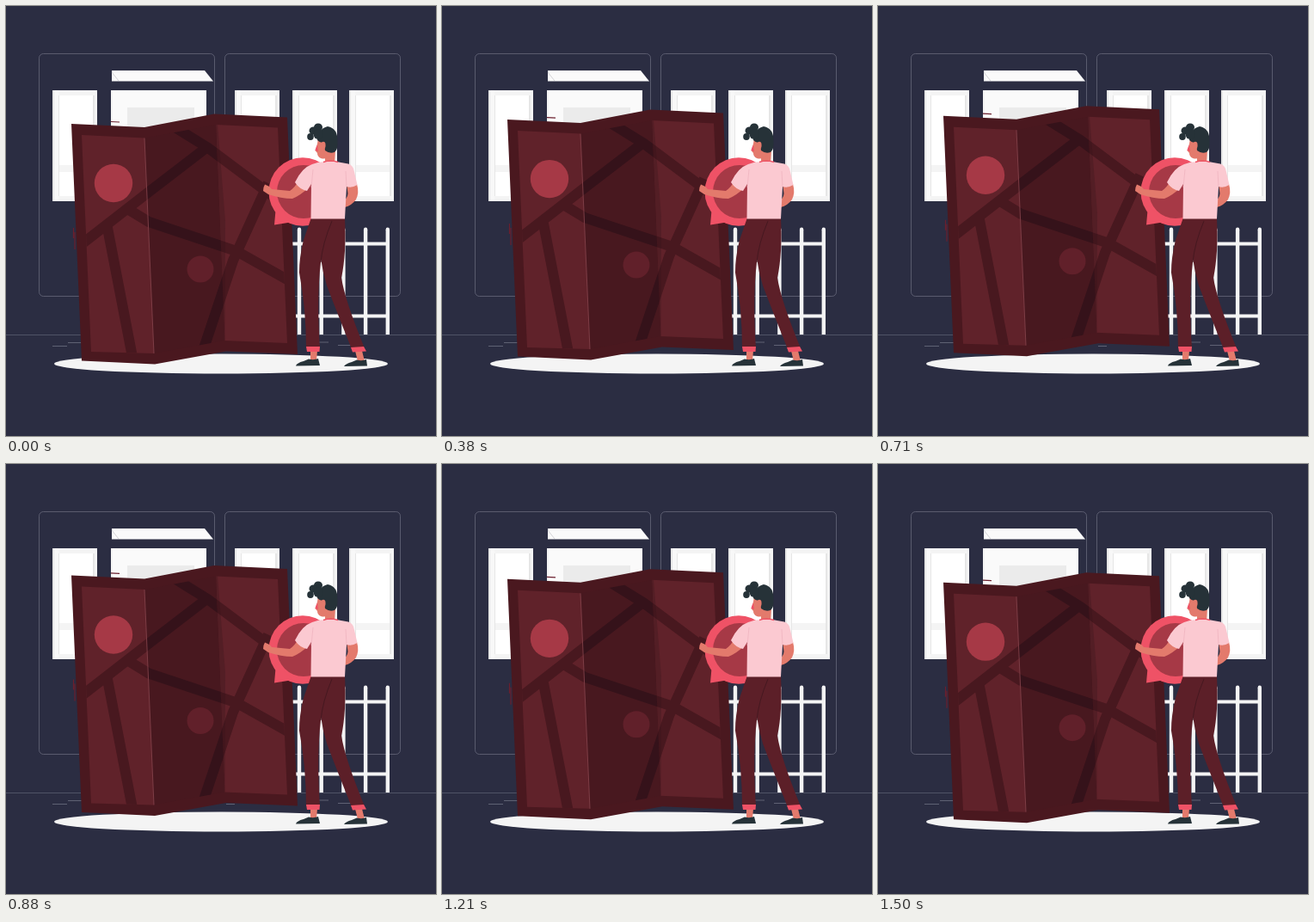
These frames come from a looping animation (500 px wide and 500 px high, 1.54 s). An HTML page with a canvas:

```html
<!DOCTYPE html>
<html lang="en">
<head>
<meta charset="utf-8">
<title>Floating map</title>
<style>
html, body { margin: 0; width: 100%; height: 100%; overflow: hidden; background: #2b2d42; }
canvas { display: block; width: 500px; height: 500px; }
</style>
</head>
<body>
<canvas id="stage" width="500" height="500"></canvas>
<script>
const ctx = document.getElementById('stage').getContext('2d');
const LOOP = 1540;
const FPS = 24;

const C = {
  night: '#2b2d42', faint: '#66687a', white: '#ffffff', pale: '#f4f4f4', grey: '#e6e6e6',
  border: '#4a181f', panel: '#60222a', fold: '#48181f', road: '#48181f', foldRoad: '#35121a',
  red: '#ef5266', crimson: '#a63946', hair: '#263238', skin: '#e37a6c',
  shirt: '#fbc9d1', trousers: '#5c1f28'
};

function fill(d, color) {
  ctx.fillStyle = color;
  ctx.fill(new Path2D(d));
}

function stroke(d, color, width = 1, cap = 'butt') {
  ctx.strokeStyle = color;
  ctx.lineWidth = width;
  ctx.lineCap = cap;
  ctx.lineJoin = 'miter';
  ctx.stroke(new Path2D(d));
}

function rect(x, y, w, h, color) {
  ctx.fillStyle = color;
  ctx.fillRect(x, y, w, h);
}

function ellipse(x, y, rx, ry, color) {
  ctx.fillStyle = color;
  ctx.beginPath();
  ctx.ellipse(x, y, rx, ry, 0, 0, Math.PI * 2);
  ctx.fill();
}

function drawWindow(x) {
  rect(x, 98, 52, 129, C.pale);
  rect(x, 98, 2, 129, C.grey);
  rect(x + 8, 104, 39, 117, C.white);
  rect(x + 2, 98, 5, 129, '#f8f8f8');
  rect(x + 7, 104, 1, 117, C.grey);
  rect(x + 47, 104, 2, 117, C.grey);
  rect(x + 8, 185, 39, 8, C.pale);
}

function drawRoom() {
  rect(0, 0, 500, 500, C.night);
  ctx.strokeStyle = C.faint;
  ctx.lineWidth = 0.8;
  for (const x of [38.5, 254.5]) {
    ctx.beginPath();
    ctx.roundRect(x, 55.5, 204, 282, 5);
    ctx.stroke();
  }
  stroke('M0 382.5H500', '#55576a', 0.9);
  stroke('M54 395.5H71 M72 391.5H88 M256 395.5H266 M362 391H375 M386 394.5H402', C.faint, 0.9);

  [54, 266, 333, 399].forEach(drawWindow);
  rect(122, 98, 111, 129, '#fafafa');
  rect(122, 98, 2, 129, C.pale);
  rect(141, 118, 78, 100, '#ebebeb');
  fill('M123 75H231L241 87.5H123Z', '#fafafa');
  stroke('M123 77L131 87', '#c9c9cf', 0.8);

  ellipse(250, 416, 194, 11.5, C.pale);
}

function drawFence() {
  stroke('M332 276.5H444 M332 360.5H444', C.pale, 4.2);
  for (let i = 0; i < 5; i++) {
    const x = 341 + i * 25.7;
    rect(x - 2.2, 260, 4.4, 122, C.pale);
    ellipse(x, 260, 2.2, 2.4, C.pale);
  }
}

const ROADS = 'M84 280L165 217L234 164 M193 139L235 165L310 221 ' +
  'M143 237L166 251L268 285L332 321 M305 206L264 296L230 398 M118 258L147 408';
const SIDES = 'M88 150L161 153.5L172 404L99 402Z M244 138L316 141.5L327 392L254 389Z';
const MIDDLE = 'M161 153.5L244 138L254.5 389L172 404Z';

function drawPanel(shape, color, roadColor) {
  ctx.save();
  ctx.clip(new Path2D(shape));
  rect(70, 120, 280, 300, color);
  stroke(ROADS, roadColor, 12);
  ctx.restore();
}

function drawMap(dy) {
  ctx.save();
  ctx.translate(0, dy);
  stroke('M122 134.5L132 135 M78.5 258V270 M80 263V283', '#6b1f2e', 1.2);
  fill('M76 137L161 141L242 125.5L327 129.5L339 405L256 401.5L173 416.5L88 412.5Z', C.border);
  drawPanel(SIDES, C.panel, C.road);
  drawPanel(MIDDLE, C.fold, C.foldRoad);
  fill('M244 138L246 138L255 250L254.5 389Z', 'rgba(53,18,26,.28)');
  stroke('M161 153.5L172 404', '#8b4750', 0.8);
  ellipse(125, 206, 22.2, 22.2, C.crimson);
  ellipse(226, 306, 15.5, 15.5, '#61202a');
  ctx.restore();
}

function drawPin() {
  ellipse(345, 216, 39.5, 39.8, C.red);
  fill('M314 232L312 254.5L334 251Z', C.red);
  ellipse(346, 216, 31, 31, C.crimson);
}

function drawPerson() {
  // Far arm, shoes and ankles
  fill('M396 207L408 207Q411 217 407 225Q402 232 394 234L393 226Q399 222 397 214Z', C.skin);
  fill('M354 401H362L361 412H354Z M406 401L414 401L417 413L409 413Z', C.skin);
  fill('M337 418.5Q338 415 346 413L352 410.5Q358 412 363 410L365 418Z', C.hair);
  fill('M393 419Q395 416 402 414L408 411.5Q414 413 419 411L420 418.5Z', C.hair);

  // Legs
  fill('M394 246Q396 288 390 316Q394 342 417 398L402 399Q384 354 373 325Q368 309 366 293L373 246Z', C.trousers);
  fill('M355 246H380Q369 278 366 298Q361 340 365 398H349Q349 352 341 310Q341 292 346 272Z', C.trousers);
  stroke('M379 250Q368 276 366 298', '#431820', 0.9);
  fill('M349 396H365L364.5 402H350Z M401 397L416 396L419 401.5L403 402.5Z', C.red);

  // Reaching arm
  fill('M341 202Q336 211 330 215L309 213Q306 209 301 207.5L299.5 211L299 215L305 219Q320 224 333 224Q343 220 353 210Z', C.skin);

  // Neck and shirt
  fill('M371 168H383L382 184H371Z', C.skin);
  fill('M356 184Q363 181 371 181H384L398 183.5Q404 185 405 193L408.5 208Q402 212 396 210L394 247.5H354.5L355 207L350 215Q341 213 336 205Q344 188 356 184Z', C.shirt);
  stroke('M357 190L355 211 M395 192L396 210', '#efb4bf', 0.8);
  stroke('M369 181.5Q377 178.5 386 181.5', C.red, 1.7);

  // Head
  fill('M363 154H378V173Q373 179 366 177Q362 175 362 171L359.5 168Q362 164 362 160Z', C.skin);
  fill('M362 161Q360 165 359.5 168L363 169Z', C.red);
  fill('M362 156Q362 143 374 140Q386 142 385.5 158Q386 167 382 170Q376 172 371 168L370 158Q366 160 362 156Z', C.hair);
  ellipse(369, 162, 2.6, 4.2, C.skin);
  ellipse(363, 141, 5, 4.6, C.hair);
  ellipse(357.5, 145, 5, 4.5, C.hair);
  ellipse(354, 152, 3.8, 4, C.hair);
  ellipse(363, 149, 5.5, 6, C.hair);
}

// The map rises and sinks at constant speed, held on 24 steps per second.
function mapOffset(time) {
  const step = Math.floor((time + 5) * FPS / 1000);
  return (Math.abs(step - 17.4) - 17.4) * 0.546;
}

function frame(now) {
  drawRoom();
  drawFence();
  drawMap(mapOffset((now - start) % LOOP));
  drawPin();
  drawPerson();
  requestAnimationFrame(frame);
}

const start = performance.now();
frame(start);
</script>
</body>
</html>
```
